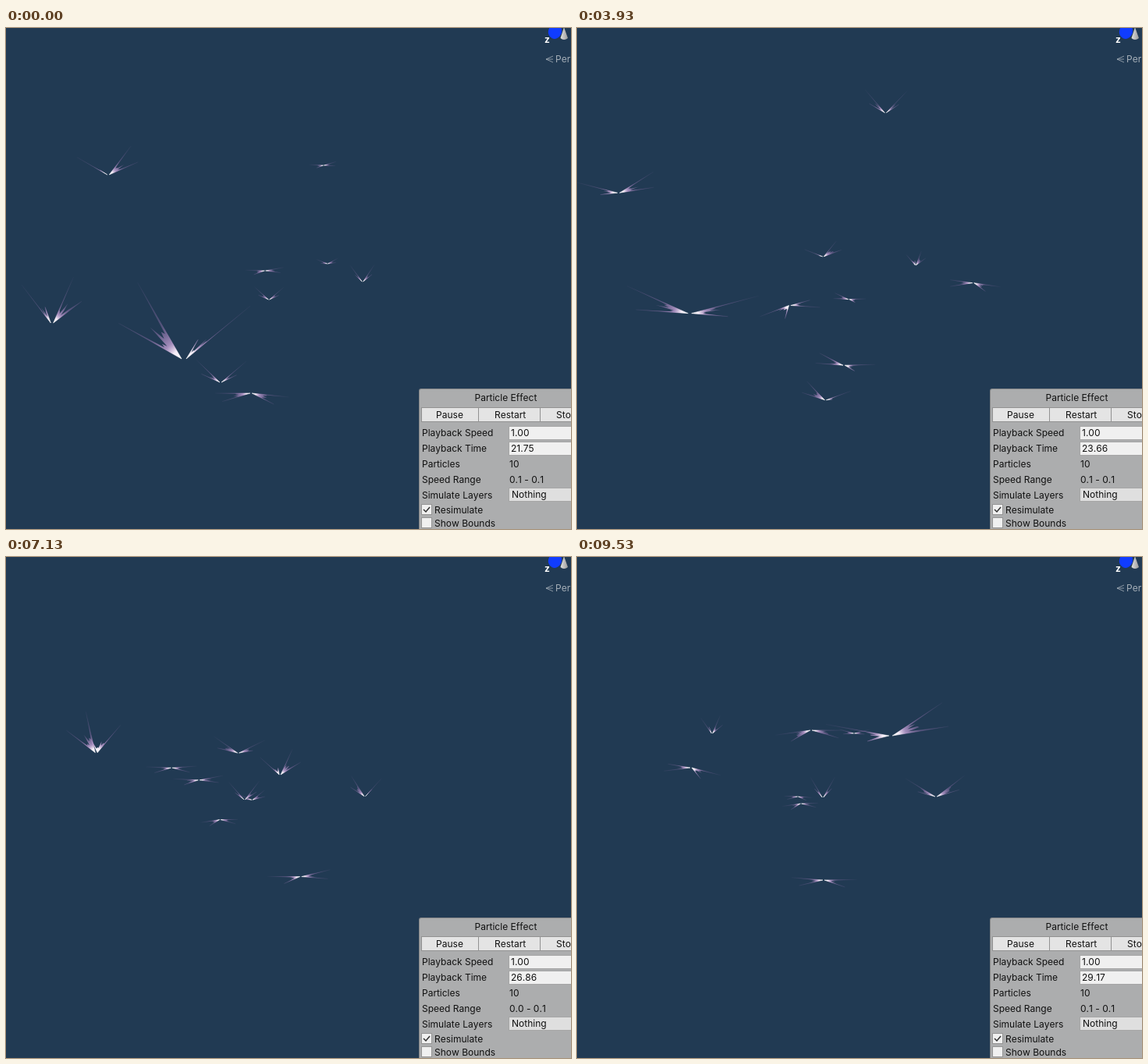
These frames come from a looping animation (724 px wide and 642 px high, 9.59 s). An HTML page with a canvas:

```html
<!DOCTYPE html>
<html lang="en">
<head>
<meta charset="utf-8">
<title>Particle butterflies</title>
<style>
  html, body { margin: 0; width: 100%; height: 100%; overflow: hidden; background: #213a53; }
  canvas { display: block; }
</style>
</head>
<body>
<canvas id="stage" width="724" height="642"></canvas>
<script>
const ctx = document.getElementById('stage').getContext('2d');
const LOOP = 9590, FPS = 15, START = 36, END = 143;
const TAU = Math.PI * 2, TILT = 0.35;
const INK = '#101010', PALE = '#a5afb8';

const mix = (a, b, u) => a + (b - a) * u;
const clamp = (v, lo, hi) => Math.min(hi, Math.max(lo, v));

function random(seed) {
  return () => {
    seed = (seed * 16807) % 2147483647;
    return seed / 2147483647;
  };
}

const flies = [];

// Lives from tick t0 to t1, growing from s0 to s1, along a smooth path
function fly([t0, t1], [s0, s1], ...path) {
  const rnd = random(1500 + flies.length * 7919);
  rnd();
  flies.push({
    t0, t1, s0, s1, path,
    rate: mix(1.6, 2.3, rnd()),
    phase: rnd(),
    yaw: mix(-0.6, 0.6, rnd()),
    turn: mix(-0.5, 0.5, rnd()),
    spikes: Array.from({ length: 7 }, () => mix(0.2, 0.5, rnd()))
  });
}

fly([30, END], [118, 40], [228, 424], [147, 367], [48, 320], [140, 235], [146, 270]);
fly([30, 80], [50, 60], [131, 188], [58, 213], [52, 185]);
fly([80, END], [20, 88], [350, 300], [354, 274], [402, 229]);
fly([30, 38], [65, 60], [59, 378], [62, 374]);
fly([38, END], [52, 25], [292, 386], [233, 296], [173, 226]);
fly([30, 67], [18, 48], [407, 176], [393, 95]);
fly([67, END], [45, 24], [205, 289], [245, 285], [287, 316]);
fly([30, END], [25, 45], [332, 311], [300, 270], [300, 222]);
fly([30, END], [15, 45], [412, 302], [455, 306], [460, 307]);
fly([30, 67], [26, 38], [457, 325], [518, 327]);
fly([67, END], [30, 30], [295, 314], [315, 308]);
fly([30, END], [24, 20], [337, 348], [348, 345], [315, 314], [355, 226]);
fly([30, END], [42, 42], [275, 454], [395, 412], [316, 414]);
fly([30, END], [48, 18], [314, 468], [316, 468], [275, 340], [283, 307]);

// Catmull-Rom curve through the path's points
function along(path, u) {
  const last = path.length - 1;
  const i = Math.min(last - 1, Math.floor(u * last));
  const t = u * last - i;
  const at = n => path[clamp(n, 0, last)];
  return [0, 1].map(k => {
    const [a, b, c, d] = [at(i - 1)[k], at(i)[k], at(i + 1)[k], at(i + 2)[k]];
    return b + t * (c - a + t * (2 * a - 5 * b + 4 * c - d + t * (3 * (b - c) + d - a))) / 2;
  });
}

// A wing's edge seen from the camera; sweep points it forwards or back
function project(side, beat, yaw, sweep, len) {
  const x = side * Math.cos(beat) * Math.cos(sweep);
  const y = Math.sin(beat) * Math.cos(sweep);
  const z = Math.sin(sweep);
  const depth = z * Math.cos(yaw) - x * Math.sin(yaw);
  return [
    len * (x * Math.cos(yaw) + z * Math.sin(yaw)),
    -len * (y * Math.cos(TILT) + depth * Math.sin(TILT))
  ];
}

function drawWing(side, beat, yaw, len, spikes) {
  const edge = (sweep, reach) => project(side, beat, yaw, sweep, len * reach);
  const lead = edge(0.2, 1), rear = edge(-0.65, 0.85);
  const glow = ctx.createRadialGradient(0, 0, 0, 0, 0, len);
  glow.addColorStop(0, '#fff');
  glow.addColorStop(0.1, 'rgba(255,245,255,.95)');
  glow.addColorStop(0.2, 'rgba(216,174,230,.7)');
  glow.addColorStop(0.42, 'rgba(168,124,190,.36)');
  glow.addColorStop(0.75, 'rgba(150,110,172,.2)');
  glow.addColorStop(1, 'rgba(150,110,172,.06)');

  ctx.fillStyle = ctx.strokeStyle = glow;
  ctx.beginPath();
  ctx.moveTo(0, 0);
  ctx.lineTo(...lead);
  spikes.forEach((reach, i) => ctx.lineTo(...edge(mix(0.1, -0.55, i / 6), reach)));
  ctx.lineTo(...rear);
  ctx.fill();

  ctx.lineWidth = 0.6;
  for (const tip of [lead, rear]) {
    ctx.beginPath();
    ctx.moveTo(0, 0);
    ctx.lineTo(...tip);
    ctx.stroke();
  }
}

function drawFly(f, tick, seconds) {
  const u = clamp((tick - f.t0) / (f.t1 - f.t0), 0, 1);
  const [x, y] = along(f.path, u);
  const len = f.s0 * (f.s1 / f.s0) ** u;
  const beat = 0.45 + 0.6 * Math.sin(TAU * (f.rate * seconds + f.phase));
  const yaw = f.yaw + f.turn * Math.sin(TAU * u);
  for (const side of [-1, 1]) {
    ctx.save();
    ctx.translate(x + side * len * 0.025, y);
    drawWing(side, beat, yaw, len, f.spikes);
    ctx.restore();
  }
}

function box(x, y, w, h, fill, edge) {
  ctx.fillStyle = edge;
  ctx.fillRect(x, y, w, h);
  ctx.fillStyle = fill;
  ctx.fillRect(x + 1, y + 1, w - 2, h - 2);
}

function label(str, x, y, align = 'left', color = INK, weight = 400) {
  ctx.font = `${weight} 12px Inter, "Open Sans", sans-serif`;
  ctx.fontKerning = 'none';
  ctx.textAlign = align;
  ctx.fillStyle = color;
  ctx.fillText(str, x, y);
}

function line(color, width, ...pts) {
  ctx.strokeStyle = color;
  ctx.lineWidth = width;
  ctx.beginPath();
  pts.forEach(p => ctx.lineTo(...p));
  ctx.stroke();
}

function drawGizmo() {
  ctx.fillStyle = '#103cff';
  ctx.beginPath();
  ctx.ellipse(703.5, 4.5, 8.5, 9.5, 0.4, 0, TAU);
  ctx.fill();
  const shade = ctx.createLinearGradient(710, 0, 720, 0);
  shade.addColorStop(0, '#e4e4e4');
  shade.addColorStop(1, '#9a9a9a');
  ctx.fillStyle = shade;
  ctx.beginPath();
  ctx.moveTo(715, -1);
  ctx.lineTo(720, 13);
  ctx.quadraticCurveTo(715, 17, 710.5, 13);
  ctx.fill();
  label('z', 690, 19, 'left', '#fff', 700);
  for (const y of [36, 40, 44]) line(PALE, 0.8, [692, 40], [701, y]);
  label('Persp', 704, 44, 'left', PALE);
}

function drawPanel(clock, speed) {
  ctx.fillStyle = '#858789';
  ctx.beginPath();
  ctx.roundRect(529, 462, 220, 200, 3);
  ctx.fill();
  ctx.fillStyle = '#acadae';
  ctx.beginPath();
  ctx.roundRect(530, 463, 220, 200, 2);
  ctx.fill();

  label('Particle Effect', 640.5, 478, 'center');
  for (const x of [532, 605, 684]) box(x, 486, 80, 19, '#e4e4e4', '#929292');
  label('Pause', 568.5, 500, 'center');
  label('Restart', 646, 500, 'center');
  label('Stop', 705, 500);

  const names = ['Playback Speed', 'Playback Time', 'Particles', 'Speed Range', 'Simulate Layers'];
  names.forEach((s, i) => label(s, 533, 523 + i * 20));
  box(644, 510, 100, 18, '#f0f0f0', '#a6a6a6');
  box(644, 530, 100, 18, '#f0f0f0', '#a6a6a6');
  box(644, 589, 100, 18, '#dfdfdf', '#a6a6a6');
  label('1.00', 647, 523);
  label(clock, 647, 543);
  label('10', 645, 563);
  label(speed, 645, 583);
  label('Nothing', 648, 602);

  for (const y of [610, 627]) box(532, y, 14, 14, '#f0f0f0', '#959595');
  line('#303030', 1.5, [535, 617], [538, 620], [543, 614]);
  label('Resimulate', 549, 622);
  label('Show Bounds', 549, 639);
}

// The clock runs in real time, then a little slower near the end
function clockAt(tick) {
  if (tick < START) return 21.75;
  return tick < 120
    ? 22.13 + (tick - START) / FPS
    : mix(27.73, 29.17, (tick - 120) / (END - 120));
}

function speedAt(tick) {
  if (tick < 67 || tick > 131) return '0.1 - 0.1';
  return tick < 85 ? '0.0 - 0.2' : '0.0 - 0.1';
}

function draw(ms) {
  const tick = Math.floor((ms % LOOP + 5) * FPS / 1000);
  const moving = tick >= START;
  // Before the start only the wings stir, skipping every third tick
  const waited = Math.min(tick, 22);
  const beats = moving ? tick : waited - Math.floor(waited / 3);

  ctx.fillStyle = '#213a53';
  ctx.fillRect(0, 0, 724, 642);
  const now = moving ? tick : 30;
  for (const f of flies) {
    if (now >= f.t0 && (now < f.t1 || f.t1 === END)) drawFly(f, now, beats / FPS);
  }
  drawGizmo();
  drawPanel(clockAt(tick).toFixed(2), speedAt(tick));
}

const began = performance.now();
function loop() {
  draw(performance.now() - began);
  requestAnimationFrame(loop);
}
loop();
</script>
</body>
</html>
```
